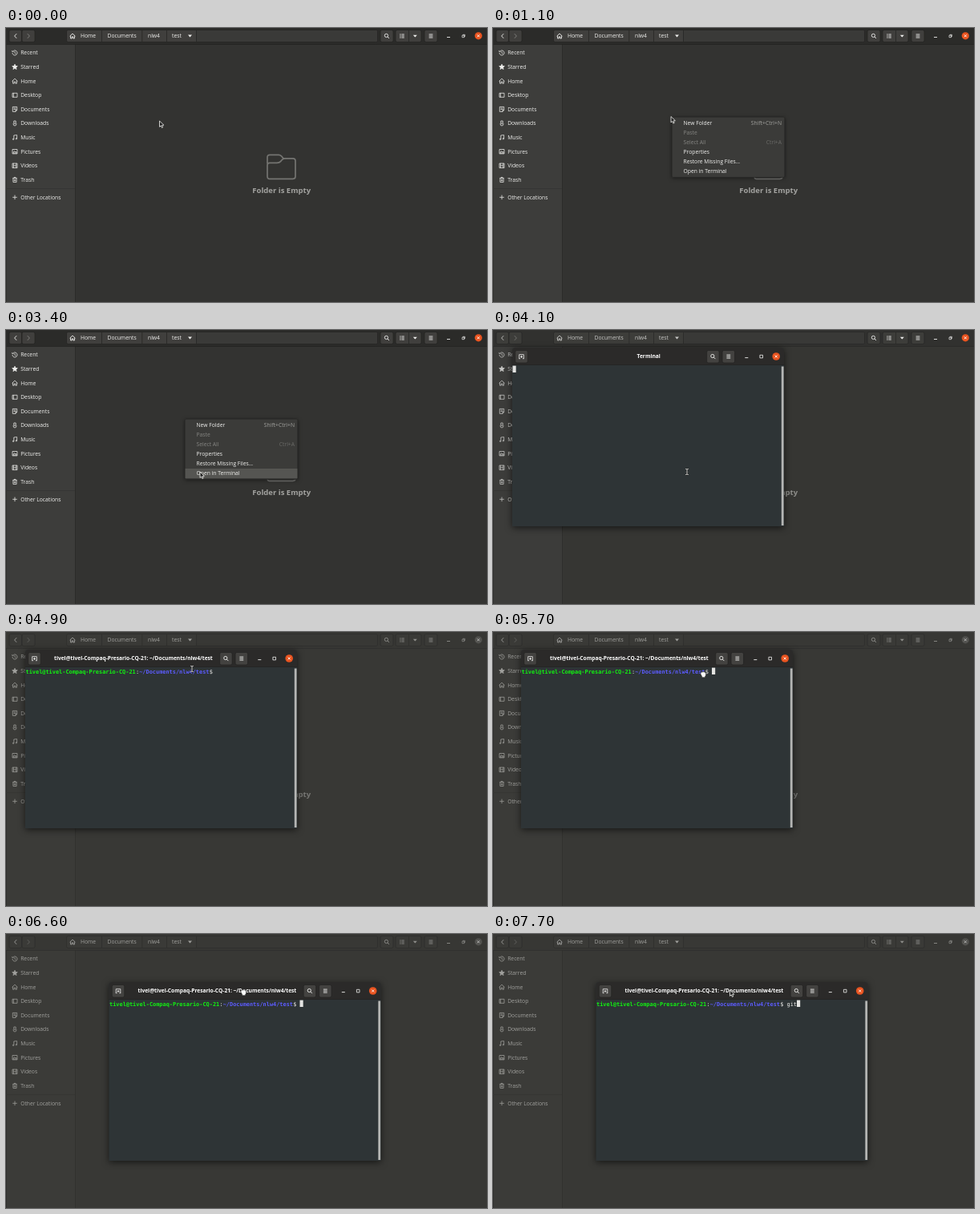
Write an HTML page with a canvas that moves like this. It is 600 px wide and 342 px high and loops after 8000 ms.

```html
<!DOCTYPE html>
<html lang="en">
<head>
<meta charset="utf-8">
<title>Opening a terminal</title>
<style>
html, body { margin: 0; width: 100%; height: 100%; overflow: hidden; background: #333331; }
canvas { display: block; width: 600px; height: 342px; }
</style>
</head>
<body>
<canvas id="stage"></canvas>
<script>
const W = 600, H = 342, LOOP = 8000, STEP = 100;
const SANS = '"Open Sans", "Noto Sans", sans-serif';
const MONO = '"DejaVu Sans Mono", monospace';
const UI = '6.75px ' + SANS;
const HOST = 'tivel@tivel-Compaq-Presario-CQ-21';
const PATH = '~/Documents/nlw4/test';
const CELL = 4.167;

const canvas = document.getElementById('stage');
const ctx = canvas.getContext('2d');
const dpr = window.devicePixelRatio || 1;
canvas.width = W * dpr;
canvas.height = H * dpr;

// Key lists hold [time, x, y]
const POINTER = [
  [0, 191.5, 116], [100, 207, 113], [200, 222, 110.5], [1700, 222, 110.5],
  [1800, 226, 112], [2200, 241.5, 139], [2600, 242, 171], [2700, 242, 176],
  [3300, 242, 176], [3400, 242, 177], [4100, 242, 177], [4700, 262, 56],
  [5200, 187, 31], [5300, 187, 31], [5400, 191, 32], [5700, 261.5, 50],
  [6200, 292.5, 67], [6300, 292.5, 67], [6600, 295.5, 70]
];
const WINDOW = [
  [0, 24, 22], [5500, 24, 22], [5600, 26, 22], [5700, 35, 22], [5800, 55, 28],
  [6200, 111.5, 49], [6300, 111.5, 49], [6600, 128.5, 60]
];

const clamp = v => Math.max(0, Math.min(1, v));

function along(keys, t) {
  const i = keys.findIndex(k => k[0] > t);
  if (i < 0) return keys[keys.length - 1].slice(1);
  const a = keys[i - 1], b = keys[i], u = (t - a[0]) / (b[0] - a[0]);
  return [a[1] + (b[1] - a[1]) * u, a[2] + (b[2] - a[2]) * u];
}

function mix(a, b, k) {
  const part = (c, i) => parseInt(c.substr(1 + 2 * i, 2), 16);
  return 'rgb(' + [0, 1, 2].map(i => Math.round(part(a, i) + (part(b, i) - part(a, i)) * k)) + ')';
}

function rect(x, y, w, h, color) {
  ctx.fillStyle = color;
  ctx.fillRect(x, y, w, h);
}

function round(x, y, w, h, r, fill, stroke) {
  ctx.beginPath();
  ctx.roundRect(x, y, w, h, r);
  if (fill) { ctx.fillStyle = fill; ctx.fill(); }
  if (stroke) { ctx.strokeStyle = stroke; ctx.lineWidth = 0.7; ctx.stroke(); }
}

function disc(x, y, r, color) {
  ctx.fillStyle = color;
  ctx.beginPath();
  ctx.arc(x, y, r, 0, 7);
  ctx.fill();
}

function text(s, x, y, color, font = UI, align = 'left') {
  ctx.font = font;
  ctx.fillStyle = color;
  ctx.textAlign = align;
  ctx.textBaseline = 'alphabetic';
  ctx.fillText(s, x, y);
}

// Stroke (and optionally fill) an SVG path placed at x, y
function glyph(d, x, y, color, width = 0.8, fill) {
  const p = new Path2D(d);
  ctx.save();
  ctx.translate(x, y);
  if (fill) { ctx.fillStyle = fill; ctx.fill(p); }
  if (width) {
    ctx.strokeStyle = color;
    ctx.lineWidth = width;
    ctx.stroke(p);
  }
  ctx.restore();
}

const ICON = {
  clock: 'M-3 0A3 3 0 1 0 -1.8 -2.4M-3.2 -3V-1.4H-1.4M0 -1.8V0.3L1.4 1.2',
  star: 'M0 -3.4L1 -1.1L3.3 -0.9L1.5 0.6L2.1 3L0 1.7L-2.1 3L-1.5 0.6L-3.3 -0.9L-1 -1.1Z',
  home: 'M-3.4 0.2L0 -3L3.4 0.2M-2.4 -0.5V3H-0.8V0.9H0.8V3H2.4V-0.5',
  desktop: 'M-3 -2.5H3V2.5H-3ZM-1.7 -2.5V2.5',
  paper: 'M-2.7 -3H2.7V1L1 3H-2.7ZM-1.4 -1.3H1.4M-1.4 0.2H1.4M1 3V1H2.7',
  down: 'M-1.2 -3H1.2V0.2H-1.2ZM-2 0.2Q-2 3 0 3Q2 3 2 0.2',
  music: 'M-1.2 2V-2.6L2.6 -3V1.5M-2.6 2.2A0.7 0.7 0 1 0 -1.2 2.2A0.7 0.7 0 1 0 -2.6 2.2M1.2 1.6A0.7 0.7 0 1 0 2.6 1.6A0.7 0.7 0 1 0 1.2 1.6',
  picture: 'M-3 -2.7H3V2.7H-3ZM-2.2 2L-0.6 -0.6L0.6 1L1.4 0L2.4 2Z',
  video: 'M-3 -2.8H3V2.8H-3ZM-1.7 -2.8V2.8M1.7 -2.8V2.8M-1.7 0H1.7',
  trash: 'M-2.8 -2H2.8M-1 -2V-3H1V-2M-2.1 -1.8V3H2.1V-1.8M-0.7 -0.5V1.8M0.7 -0.5V1.8',
  plus: 'M-2.8 0H2.8M0 -2.8V2.8',
  search: 'M-2.7 -0.6A2.1 2.1 0 1 0 1.5 -0.6A2.1 2.1 0 1 0 -2.7 -0.6M1 1L3 3',
  bars: 'M-2.4 -2H2.4M-2.4 0H2.4M-2.4 2H2.4',
  list: 'M-2.8 -2H-1.4M-2.8 0H-1.4M-2.8 2H-1.4M-0.6 -2H2.8M-0.6 0H2.8M-0.6 2H2.8',
  caret: 'M-2.5 -1.2H2.5L0 1.6Z',
  cross: 'M-1.5 -1.5L1.5 1.5M1.5 -1.5L-1.5 1.5',
  tab: 'M-2.8 2.6V-2.4H2.8V2.6M-3.2 2.6H-1.4M1.4 2.6H3.2M0 -1.2V1.8M-1.5 0.3H1.5'
};

const PLACES = [
  ['clock', 'Recent'], ['star', 'Starred'], ['home', 'Home'], ['desktop', 'Desktop'],
  ['paper', 'Documents'], ['down', 'Downloads'], ['music', 'Music'],
  ['picture', 'Pictures'], ['video', 'Videos'], ['trash', 'Trash']
];

const CRUMBS = [['Home', 93], ['Documents', 126.5], ['nlw4', 177], ['test', 207]];

function fileManager(k, k2) {
  const fg = mix('#f0f0ee', '#a0a09d', k);
  const tool = mix('#eeeeec', '#8e8e8b', k2);
  const button = mix('#403f3d', '#3a3a37', k);
  const edge = mix('#232321', '#2d2d2b', k);
  const box = (x, w) => round(x, 2.5, w, 15, 2, button, edge);

  rect(0, 0, W, H, mix('#333331', '#383835', k));
  rect(0, 20, 86, H - 20, mix('#3d3d3b', '#3b3b38', k));
  rect(86, 20, 0.8, H - 20, mix('#2a2a28', '#30302e', k));
  rect(0, 0, W, 20, mix('#2b2b29', '#373734', k));
  rect(0, 20, W, 0.8, mix('#222220', '#2f2f2d', k));
  rect(0, 20, 0.7, H - 20, '#2a2a28');

  box(4, 15.5);
  box(20, 16);
  glyph('M1.2 -2.8L-1.4 0L1.2 2.8', 12, 10, fg, 0.9);
  glyph('M-1.2 -2.8L1.4 0L-1.2 2.8', 28, 10, mix('#858582', '#62625f', k), 0.9);

  box(75.5, 388);
  round(237, 3, 226, 14, 2, mix('#3a3a38', '#383835', k));
  for (const x of [119, 169.5, 200, 237]) rect(x, 3, 0.7, 14, edge);
  glyph(ICON.home, 83, 10, fg, 0.9);
  for (const [name, x] of CRUMBS) text(name, x, 12.2, fg);
  glyph(ICON.caret, 229.5, 9.8, fg, 0, fg);

  box(467, 16);
  box(486, 32);
  rect(502, 3, 0.7, 14, edge);
  box(522, 16);
  glyph(ICON.search, 475, 10, tool, 0.9);
  glyph(ICON.list, 494, 10, tool, 0.9);
  glyph(ICON.caret, 510.3, 10, tool, 0, tool);
  glyph(ICON.bars, 530, 10, tool, 0.9);
  rect(550, 11, 4, 0.9, tool);
  glyph('M-1.6 -0.8H0.9V1.7H-1.6ZM-0.6 -0.8V-1.7H1.8V0.7H0.9', 570.6, 10, tool, 0.7);
  disc(589.3, 9.8, 4.6, mix('#e95420', '#52524f', k2));
  glyph(ICON.cross, 589.3, 9.8, mix('#ffffff', '#bdbdba', k2), 0.9);

  PLACES.forEach(([icon, name], i) => {
    const y = 31 + i * 17.6;
    glyph(ICON[icon], 11, y, fg, 0.75, icon === 'star' ? fg : null);
    text(name, 18.2, y + 2.4, fg);
  });
  rect(0, 200, 86, 0.7, mix('#333331', '#343432', k));
  glyph(ICON.plus, 11, 211.3, fg, 0.75);
  text('Other Locations', 18.2, 213.7, fg);

  const dim = mix('#747471', '#6a6a67', k);
  glyph('M1 12V4Q1 1 4 1H15Q17 1 18.5 2.5L21 5.5H33Q36 5.5 36 8.5V28Q36 31 33 31H4Q1 31 1 28V14Q1 11 4 11H13Q16 11 17.5 9.3L19.5 7Q21 5.5 23 5.5',
    325, 157.3, dim, 1.7);
  text('Folder is Empty', 343.7, 206.2, mix('#a3a3a0', '#777774', k), 'bold 9.5px ' + SANS, 'center');
}

const MENU = [
  ['New Folder', 'Shift+Ctrl+N', true], ['Paste', '', false], ['Select All', 'Ctrl+A', false],
  ['Properties', '', true], ['Restore Missing Files…', '', true], ['Open in Terminal', '', true]
];

function shadow(blur, drop, alpha) {
  ctx.shadowColor = 'rgba(0,0,0,' + alpha + ')';
  ctx.shadowBlur = blur * dpr;
  ctx.shadowOffsetY = drop * dpr;
}

function menu(t, py) {
  ctx.save();
  shadow(5, 1, 0.5);
  round(223, 111, 141, 75.5, 1.5, '#3b3b39');
  ctx.restore();
  round(223.2, 111.2, 140.6, 75.2, 1.5, null, '#252523');
  const hover = t >= 1800 ? Math.floor((py - 112.8) / 12) : -1;
  MENU.forEach(([label, keys, live], i) => {
    const y = 118.8 + i * 12;
    if (live && i === hover) rect(223.6, y - 5.8, 139.8, 12, '#555552');
    text(label, 237.5, y + 2.5, live ? '#f0f0ee' : '#858582');
    text(keys, 360, y + 2.5, live ? '#a0a09d' : '#6a6a67', UI, 'right');
  });
}

function terminal(t, x, y) {
  const ready = t >= 4400;
  const fg = '#f2f2f0';
  const cell = (cx, w) => round(cx - w / 2, 3.5, w, 15.5, 2, '#434240', '#232321');
  ctx.save();
  ctx.translate(x, y);
  if (t < 4100) {
    ctx.globalAlpha = 0.6;
    ctx.translate(170, 111);
    ctx.scale(0.97, 0.97);
    ctx.translate(-170, -111);
  }
  ctx.save();
  shadow(9, 2, 0.6);
  round(0, 0, 339, 223, [4, 4, 0, 0], '#2e3436');
  ctx.restore();
  round(0, 0, 339, 21.8, [4, 4, 0, 0], '#2b2a29');
  rect(0, 21.3, 339, 0.6, '#20201f');

  cell(11.5, 15.5);
  cell(250.4, 15.5);
  cell(269.8, 15.5);
  glyph(ICON.tab, 11.5, 11.1, fg, 0.8);
  glyph(ICON.search, 250.4, 11.1, fg, 0.9);
  glyph(ICON.bars, 269.8, 11.1, fg, 0.9);
  rect(290.3, 12.2, 4, 0.9, fg);
  glyph('M-1.8 -1.8H1.8V1.8H-1.8Z', 310.7, 11.1, fg, 0.8);
  disc(329.2, 11, 4.8, '#e95420');
  glyph(ICON.cross, 329.2, 11, '#fff', 0.9);

  const bold = 'bold 6.65px ' + SANS;
  if (ready) text(HOST + ': ' + PATH, 36, 13.1, '#fff', bold);
  else text('Terminal', 170.2, 13.1, '#fff', bold, 'center');

  rect(335.8, 23.5, 2.8, 198.5, '#b4b5b3');

  const font = '6.92px ' + MONO;
  const left = 0.5, base = 29.8;
  let col = 0;
  const put = (s, color, f) => {
    text(s, left + col * CELL, base, color, f);
    col += s.length;
  };
  if (ready) {
    put(HOST, '#12f212', 'bold ' + font);
    put(':', '#eeeeec', font);
    put(PATH, '#5c5cff', 'bold ' + font);
    put('$ ', '#eeeeec', font);
    put('git'.slice(0, t >= 7700 ? 3 : t >= 7500 ? 2 : t >= 7400 ? 1 : 0), '#eeeeec', font);
  }
  const lit = t >= 7300 || t < 4600 || Math.floor((t - 4600) / 600) % 2 === 1;
  if (lit) rect(left + col * CELL, 22.6, CELL, 8.4, '#e4e4e2');
  ctx.restore();
}

function pointer(kind, x, y) {
  ctx.lineJoin = 'round';
  if (kind === 'arrow') {
    glyph('M0 0V7.4L1.7 5.9L2.9 8.5L4.2 7.9L3 5.4L5.4 5.2Z', x, y, '#f4f4f2', 0.8, '#222222');
  } else if (kind === 'beam') {
    const d = 'M-1.8 -3.6Q0 -3.6 0 -2.8Q0 -3.6 1.8 -3.6M0 -2.8V2.8M-1.8 3.6Q0 3.6 0 2.8Q0 3.6 1.8 3.6';
    glyph(d, x, y, '#111111', 2);
    glyph(d, x, y, '#f4f4f2', 0.9);
  } else {
    glyph('M-3 2.6Q-3.7 1.1 -2.1 0.8V0.2Q-1.4 -0.8 -0.6 0Q0.2 -0.9 1 0Q1.9 -0.5 2.5 0.4Q3.7 0.3 3.6 1.7V3.6Q3.4 4.7 2.6 5.6V6.7H-1.4V5.6Z',
      x + 0.5, y, '#222222', 0.6, '#fafaf8');
  }
  ctx.lineJoin = 'miter';
}

function draw(t) {
  ctx.setTransform(dpr, 0, 0, dpr, 0, 0);
  const [px, py] = along(POINTER, t);
  const [wx, wy] = along(WINDOW, t);
  fileManager(clamp((t - 3900) / 400), clamp((t - 4100) / 200));
  if (t >= 1100 && t < 3900) menu(t, py);
  if (t >= 4000) terminal(t, wx, wy);
  let kind = 'arrow';
  if (t >= 5400 && t < 7300) kind = 'hand';
  else if (t >= 4100 && py > wy + 21) kind = 'beam';
  pointer(kind, px, py);
}

function tick() {
  const t = performance.now() % LOOP;
  draw(Math.floor(t / STEP) * STEP);
  requestAnimationFrame(tick);
}
tick();
</script>
</body>
</html>
```
